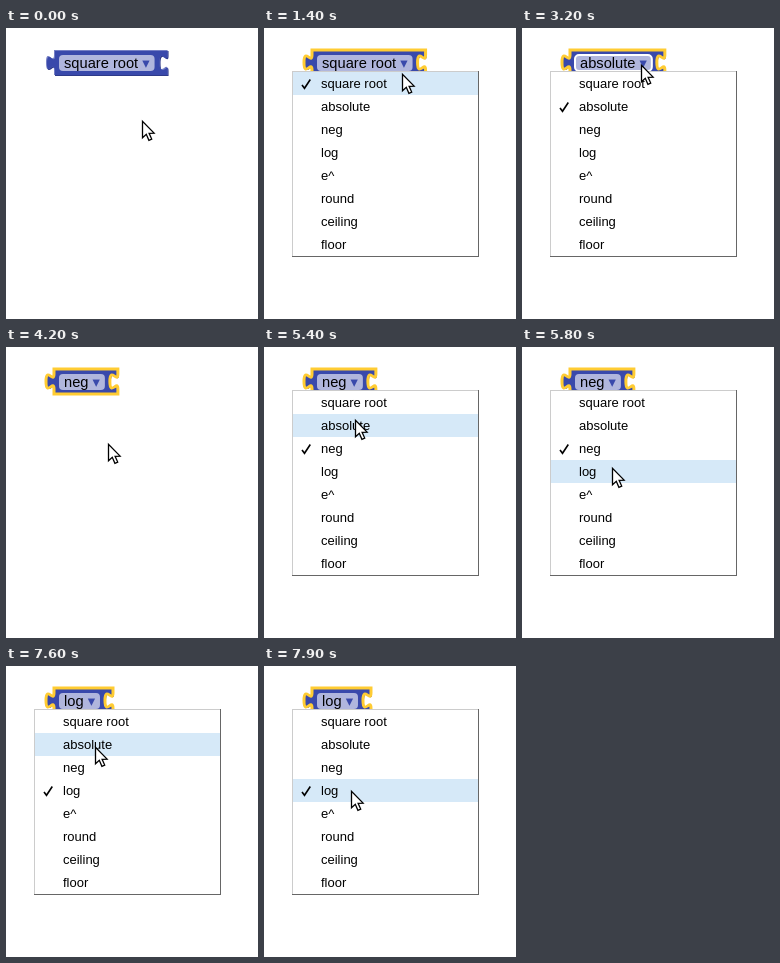
These frames come from a looping animation (252x291 px, 8 s). An HTML page with a canvas:

```html
<!DOCTYPE html>
<html lang="en">
<head>
<meta charset="utf-8">
<title>Dropdown block</title>
<style>
html, body { margin: 0; width: 100%; height: 100%; overflow: hidden; background: #fff; }
canvas { display: block; width: 252px; height: 291px; }
</style>
</head>
<body>
<canvas id="stage"></canvas>
<script>
const W = 252, H = 291, LOOP = 8000, STEP = 100;
const BLUE = '#3949ab', DARK = '#2e3a89', LIGHT = '#757fc4', YELLOW = '#ffcc33';
const LABEL_FONT = '14.667px "Liberation Sans", Arial, sans-serif';
const ARROW_FONT = '14.667px "DejaVu Sans", sans-serif';
const MENU_FONT = '13px "Liberation Sans", Arial, sans-serif';
const OPTIONS = ['square root', 'absolute', 'neg', 'log', 'e^', 'round', 'ceiling', 'floor'];
const BLOCK = { x: 48, y: 22, h: 25 };
const MENU = { x: 28, y: 43, w: 187, h: 186, row: 23 };

// The pointer goes back and forth between the field and a resting place
const HOME = { x: 136, y: 93 };
const MOVES = [
  { from: 100, to: 600, x: 145, y: 34 },
  { from: 1300, to: 1800, x: 120, y: 80 },
  { from: 2300, to: 2800, x: 119, y: 37 },
  { from: 3200, to: 3700, x: 102, y: 97 },
  { from: 4300, to: 4800, x: 91, y: 37 },
  { from: 5200, to: 5800, x: 90, y: 121 },
  { from: 6300, to: 6900, x: 91, y: 35 },
  { from: 7400, to: 7900, x: 87, y: 125 }
];
const SELECT_AT = 1100, OPEN_AT = [1200, 3200, 5200, 7400], OPEN_FOR = 1000;

const canvas = document.getElementById('stage');
const ctx = canvas.getContext('2d');
const ratio = window.devicePixelRatio || 1;
canvas.width = W * ratio;
canvas.height = H * ratio;

const easeOut = k => 1 - (1 - k) ** 1.4;
const mix = (a, b, k) => Math.round(a + (b - a) * k);

function pointerAt(t) {
  return MOVES.reduce((tip, { from, to, x, y }) => {
    const k = easeOut(Math.min(1, Math.max(0, (t - from) / (to - from))));
    return { x: mix(tip.x, x, k), y: mix(tip.y, y, k) };
  }, HOME);
}

function textWidth(text, font) {
  ctx.font = font;
  return ctx.measureText(text).width;
}

function write(text, x, y, font, color) {
  ctx.font = font;
  ctx.fillStyle = color;
  ctx.fillText(text, x, y);
}

function fillShape(shape, color, shift) {
  ctx.save();
  ctx.translate(shift, shift);
  ctx.fillStyle = color;
  ctx.fill(shape);
  ctx.restore();
}

function strokeShape(shape, color, width) {
  ctx.strokeStyle = color;
  ctx.lineWidth = width;
  ctx.stroke(shape);
}

// Puzzle outline: plug on the left, matching socket on the right
function blockPath(w) {
  return new Path2D(`M0,0 H${w} v5 c0,10 -8,-8 -8,7.5 s8,-2.5 8,7.5 V${BLOCK.h} H0 V20
    c0,-10 -8,8 -8,-7.5 s8,2.5 8,-7.5 Z`);
}

function drawBody(width, selected) {
  const outline = blockPath(width);
  ctx.save();
  ctx.translate(BLOCK.x, BLOCK.y);
  fillShape(outline, DARK, 1);
  if (selected) {
    fillShape(outline, BLUE, 0);
    strokeShape(outline, YELLOW, 3);
  } else {
    // bevel: the light top-left edge stays visible
    fillShape(outline, LIGHT, 0);
    ctx.clip(outline);
    fillShape(outline, BLUE, 1);
  }
  ctx.restore();
}

function drawBlock(label, selected, tip) {
  const textX = BLOCK.x + 10, fieldX = BLOCK.x + 5, fieldY = BLOCK.y + 5;
  const arrowX = textX + textWidth(label + ' ', LABEL_FONT);
  const fieldW = arrowX + textWidth('▾', ARROW_FONT) + 5 - fieldX;
  drawBody(fieldW + 18, selected);

  const field = new Path2D();
  field.roundRect(fieldX, fieldY, fieldW, 16, 4);
  fillShape(field, 'rgba(255,255,255,.6)', 0);
  const inField = tip.x >= fieldX && tip.x <= fieldX + fieldW;
  if (inField && tip.y >= fieldY && tip.y < MENU.y) strokeShape(field, '#fff', 2);
  write(label, textX, 40, LABEL_FONT, '#000');
  write('▾', arrowX, 40, ARROW_FONT, BLUE);
}

function drawMenu(choice, tip) {
  const { x, y, w, h, row } = MENU;
  ctx.fillStyle = '#666';
  ctx.fillRect(x, y, w, h);
  ctx.fillStyle = '#ccc';
  ctx.fillRect(x, y, w - 1, 1);
  ctx.fillRect(x, y, 1, h - 1);
  ctx.fillStyle = '#fff';
  ctx.fillRect(x + 1, y + 1, w - 2, h - 2);

  const over = Math.floor((tip.y - y - 1) / row);
  OPTIONS.forEach((name, i) => {
    const top = y + 1 + i * row;
    if (i === over) {
      ctx.fillStyle = '#d6e9f8';
      ctx.fillRect(x + 1, top, w - 2, row);
    }
    if (i === choice) strokeShape(new Path2D(`M38,${top + 13} l2.5,3.3 l5.8,-8.8`), '#000', 1.6);
    write(name, 57, top + 16, MENU_FONT, '#000');
  });
}

function drawPointer(tip) {
  const arrow = new Path2D('M0,0 V16.5 L3.8,13 L6.4,19 L9.2,17.8 L6.6,12 L11.6,11.8 Z');
  ctx.save();
  ctx.translate(tip.x + 0.5, tip.y + 0.3);
  fillShape(arrow, '#fff', 0);
  strokeShape(arrow, '#000', 1.3);
  ctx.restore();
}

function draw(time) {
  const t = Math.floor((time % LOOP) / STEP) * STEP;
  const tip = pointerAt(t);
  const choice = OPEN_AT.filter(at => t >= at + OPEN_FOR).length;

  ctx.setTransform(ratio, 0, 0, ratio, 0, 0);
  ctx.fillStyle = '#fff';
  ctx.fillRect(0, 0, W, H);
  drawBlock(OPTIONS[choice], t >= SELECT_AT, tip);
  if (t >= OPEN_AT[choice]) drawMenu(choice, tip);
  drawPointer(tip);
}

const start = performance.now();
function tick() {
  draw(performance.now() - start);
  requestAnimationFrame(tick);
}
tick();
</script>
</body>
</html>
```
